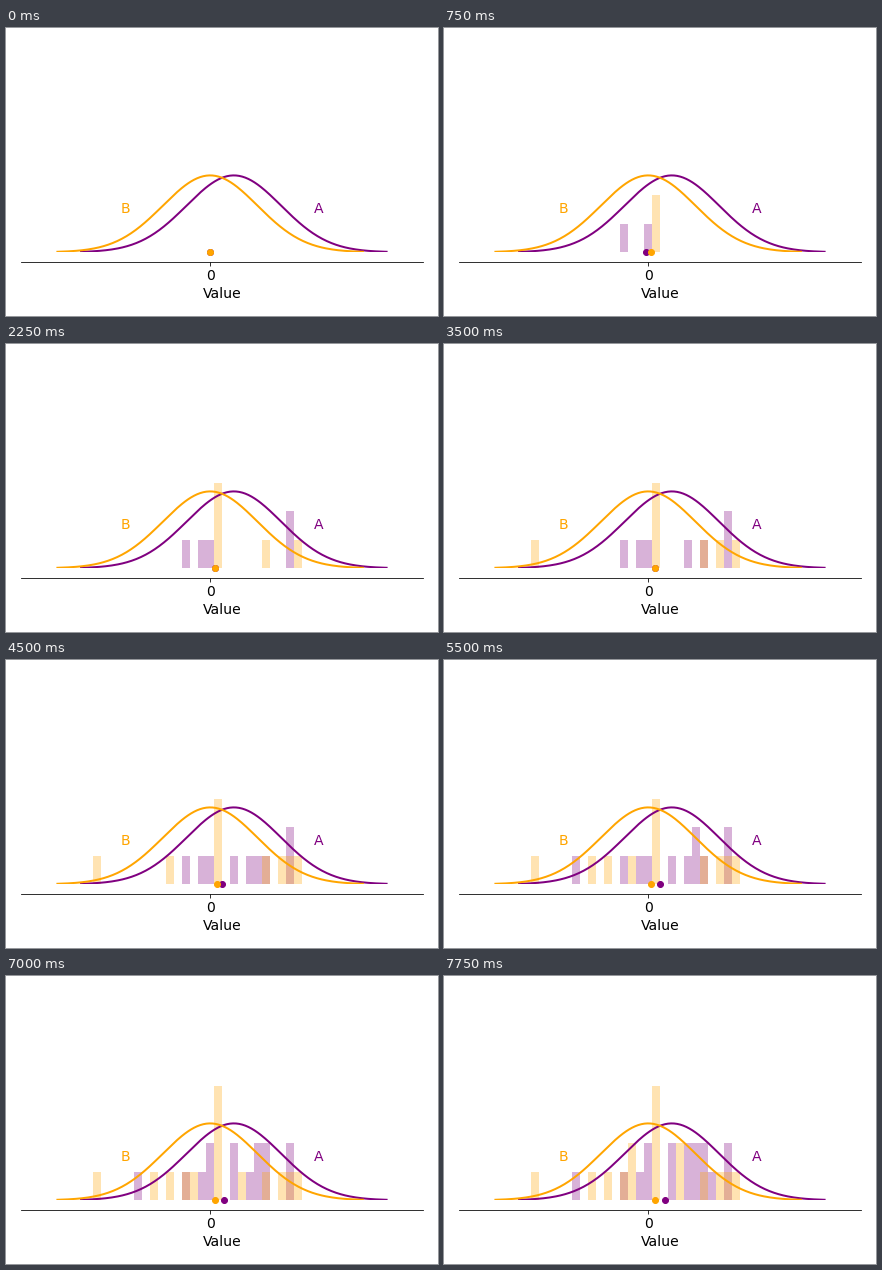
Animation of 432x288 px, one loop 8 s. Source, as a matplotlib script:

```python
import numpy as np
import matplotlib.pyplot as plt
from matplotlib.animation import FuncAnimation

W, H, DPI = 432, 288, 72
FRAMES, INTERVAL = 32, 250
LEFT, BASE, WIDTH, HEIGHT = 15, 63.8, 402, 209
XLIM = (-4, 4.5)
STEP = 0.05          # fixed move of an estimate towards each new sample
BAR = 28.45          # bar height per sample, in pixels
PEAK = 76.8          # curve height, in pixels
EDGES = np.linspace(*XLIM, 51)

# name, colour, mean, label position, samples in order of arrival
GROUPS = [
    ("A", "purple", 0.5, 2.29,
     [-0.52, 0.0, 1.69, 1.69, -0.18, 0.84, 1.18, 0.5,
      1.01, 1.01, -1.53, 1.18, 0.0, 0.5, 0.84, 1.35]),
    ("B", "orange", 0.0, -1.79,
     [0.17, 0.2, 1.18, 0.12, 1.86, -2.39, 1.52, -0.86,
      1.69, -0.35, -1.2, 0.2, -0.52, 0.68, 0.68, -0.35]),
]


def estimates(samples):
    """Running median estimate: a constant step in the sign of the error."""
    path = [0.0]
    for s in samples:
        path.append(path[-1] + STEP * np.sign(s - path[-1]))
    return path


fig = plt.figure(figsize=(W / DPI, H / DPI), dpi=DPI, facecolor="white")
ax = fig.add_axes([LEFT / W, BASE / H, WIDTH / W, HEIGHT / H])
ax.set_xlim(*XLIM)
ax.set_ylim(0, HEIGHT)
ax.spines[["left", "right", "top"]].set_visible(False)
ax.spines["bottom"].set_position(("outward", 10))
ax.set_yticks([])
ax.set_xticks([0], ["0"], fontsize=14)
ax.set_xlabel("Value", fontsize=14)

z = np.linspace(-3.23, 3.23, 200)
parts = []
for name, color, mean, label_x, samples in GROUPS:
    ax.plot(mean + z, PEAK * np.exp(-z**2 / 2), color=color, lw=2)
    ax.text(label_x, 39.2, name, color=color, fontsize=14, ha="center")
    bars = ax.bar(EDGES[:-1], np.zeros(50), np.diff(EDGES), align="edge",
                  color=color, alpha=0.3, lw=0)
    dot, = ax.plot([0], [0], "o", color=color, ms=6, clip_on=False, zorder=3)
    parts.append((samples, estimates(samples), bars, dot))
ax.set_xlim(*XLIM)
ax.set_ylim(0, HEIGHT)


def update(i):
    # new samples land first, the estimates follow one frame later
    for samples, path, bars, dot in parts:
        counts, _ = np.histogram(samples[:(i + 1) // 2], EDGES)
        for bar, n in zip(bars, counts):
            bar.set_height(n * BAR)
            bar.set_visible(n > 0)
        dot.set_xdata([path[i // 2]])
    return []


anim = FuncAnimation(fig, update, frames=FRAMES, interval=INTERVAL,
                     repeat=True, repeat_delay=0, init_func=lambda: update(0))
plt.show()
```
